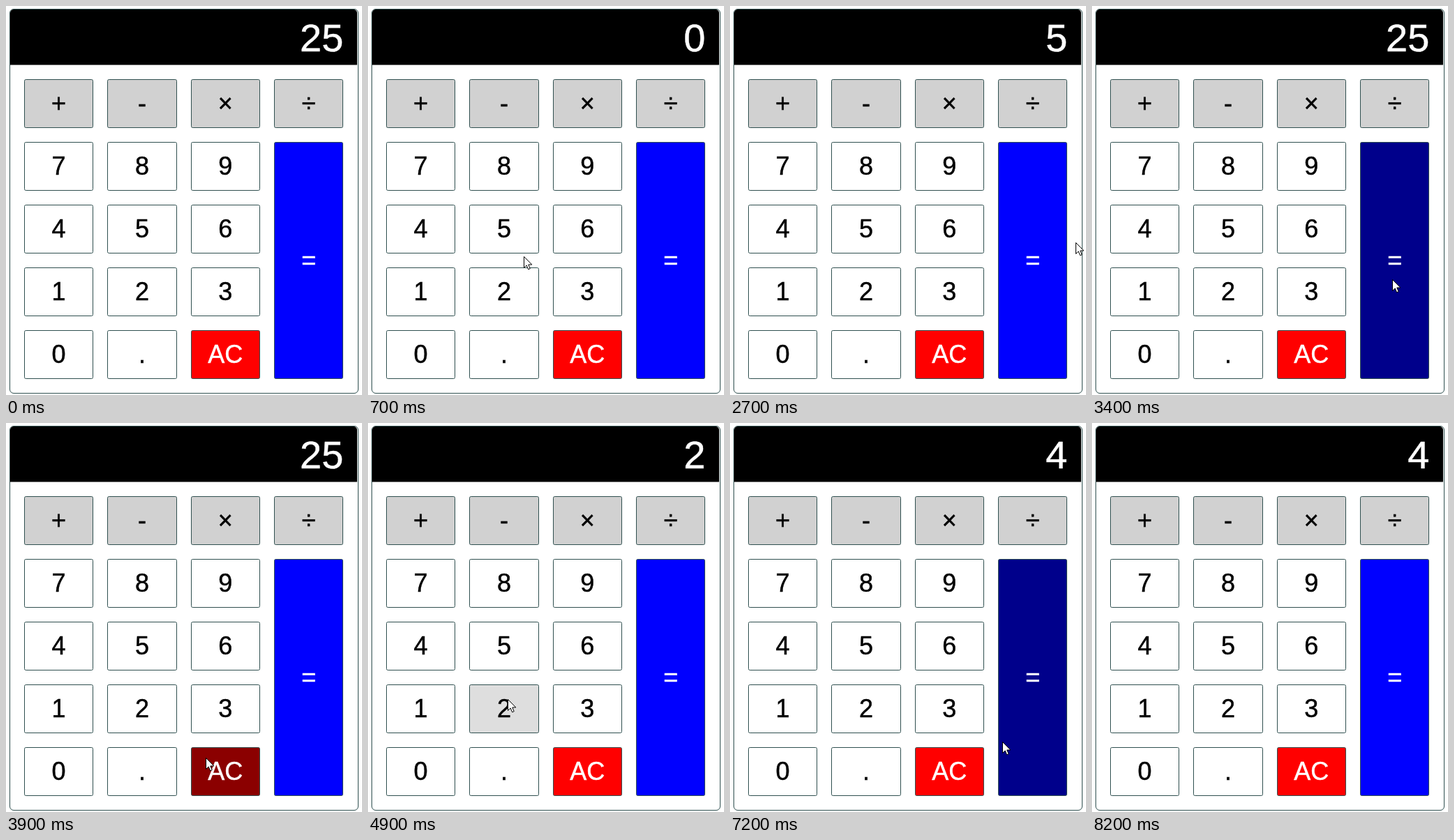
Write an HTML page that moves like this. It is 510 px wide and 558 px high and loops after 8300 ms.

```html
<!DOCTYPE html>
<html lang="en">
<head>
<meta charset="utf-8">
<title>Calculator</title>
<style>
  html, body { margin: 0; width: 100%; height: 100%; overflow: hidden; background: #fff; }
  svg { display: block; }
  text { font: 36px "Liberation Sans", Arial, sans-serif; text-anchor: middle; stroke-width: .5; }
  rect { stroke: #2f4f4f; }
  .operator { --rest: #d1d1d1; --hover: #dedede; --ink: #000; }
  .digit { --rest: #fff; --hover: #dedede; --ink: #000; }
  .clear { --rest: #f00; --hover: #8b0000; --ink: #fff; }
  .equals { --rest: #00f; --hover: #00008b; --ink: #fff; }
  .key rect { fill: var(--rest); }
  .key.over rect { fill: var(--hover); }
  .key text { fill: var(--ink); stroke: var(--ink); }
  #display { font-size: 56px; text-anchor: end; fill: #fff; stroke: #fff; }
</style>
</head>
<body>
<svg width="510" height="558" viewBox="0 0 510 558">
  <rect x="5.5" y="4.5" width="499" height="551" rx="5.5" fill="#fff"/>
  <path d="M6 84.5V10a5 5 0 0 1 5-5H498a5 5 0 0 1 5 5V84.5Z"/>
  <text id="display" x="483.3" y="65"></text>
  <g id="keys"></g>
  <path id="cursor" d="M.5 .5V16.5L4.2 13L6.6 18.8L9.2 17.7L6.8 12H11.8Z" fill="#fff" stroke="#000"/>
</svg>
<script>
const LOOP = 8300, STEP = 100;
const display = document.getElementById("display");
const cursor = document.getElementById("cursor");

function add(parent, name, attrs) {
  const node = document.createElementNS("http://www.w3.org/2000/svg", name);
  for (const key in attrs) node.setAttribute(key, attrs[key]);
  return parent.appendChild(node);
}

function makeKey(label, col, row, kind, rows = 1) {
  const exactX = 25.9 + 119.375 * col, exactWidth = 99.375;
  const x = Math.round(exactX), y = 105 + 90 * row;
  const width = Math.round(exactX + exactWidth) - x, height = 90 * rows - 20;
  const node = add(document.getElementById("keys"), "g", { class: `key ${kind}` });
  add(node, "rect", { x: x + .5, y: y + .5, width: width - 1, height: height - 1, rx: 2 });
  add(node, "text", { x: exactX + exactWidth / 2, y: y + height / 2 + 12 }).textContent = label;
  const contains = (px, py) => px >= x && px < x + width && py >= y && py < y + height;
  return { label, node, contains };
}

const keys = ["+-×÷", "789", "456", "123", "0."].flatMap((labels, row) =>
  [...labels].map((label, col) => makeKey(label, col, row, row ? "digit" : "operator")));
keys.push(makeKey("AC", 2, 4, "clear"), makeKey("=", 3, 1, "equals", 4));

// The pointer presses whatever lies under each stop.
const stops = [
  { time: 100, x: 372, y: 540 },
  { time: 500, x: 303, y: 492 },
  { time: 900, x: 203, y: 326 },
  { time: 1500, x: 296, y: 116 },
  { time: 2400, x: 203, y: 300 },
  { time: 2700, x: 495, y: 339 },
  { time: 3200, x: 466, y: 370 },
  { time: 4200, x: 286, y: 480 },
  { time: 4900, x: 200, y: 396 },
  { time: 5500, x: 84, y: 150 },
  { time: 5900, x: 196, y: 382 },
  { time: 6800, x: 398, y: 454 },
  { time: 7600, x: 388, y: 458 }
];

// Each trip takes the first 70% of its interval; the pointer rests until the press.
function pointerAt(t) {
  const next = stops.findIndex(stop => stop.time >= t);
  if (next < 1) return null;
  const a = stops[next - 1], b = stops[next];
  const p = Math.min(1, (t - a.time) / (b.time - a.time) / .7);
  const ease = p * p * (3 - 2 * p);
  return { x: Math.round(a.x + (b.x - a.x) * ease), y: Math.round(a.y + (b.y - a.y) * ease) };
}

const operations = {
  "+": (a, b) => a + b,
  "-": (a, b) => a - b,
  "×": (a, b) => a * b,
  "÷": (a, b) => a / b
};

function press(state, label) {
  const { shown, stored, operator, fresh } = state;
  if (label === "AC") return { shown: "0", fresh: true };
  if (label in operations) return { shown, stored: shown, operator: label, fresh: true };
  if (label !== "=") return { ...state, shown: fresh ? label : shown + label, fresh: false };
  if (!operator) return state;
  return { shown: String(operations[operator](+stored, +shown)), fresh: true };
}

function readingAt(t) {
  return stops.filter(stop => stop.time <= t).reduce((state, { x, y }) => {
    const key = keys.find(k => k.contains(x, y));
    return key ? press(state, key.label) : state;
  }, { shown: "25", fresh: true }).shown;
}

function draw(now) {
  const t = Math.floor(now % LOOP / STEP) * STEP;
  const point = pointerAt(t);
  display.textContent = readingAt(t);
  cursor.style.display = point ? "" : "none";
  if (point) cursor.setAttribute("transform", `translate(${point.x} ${point.y})`);
  for (const { node, contains } of keys)
    node.classList.toggle("over", !!point && contains(point.x, point.y));
}

let start;
function tick(now) {
  start ??= now;
  draw(now - start);
  requestAnimationFrame(tick);
}
draw(0);
requestAnimationFrame(tick);
</script>
</body>
</html>
```
